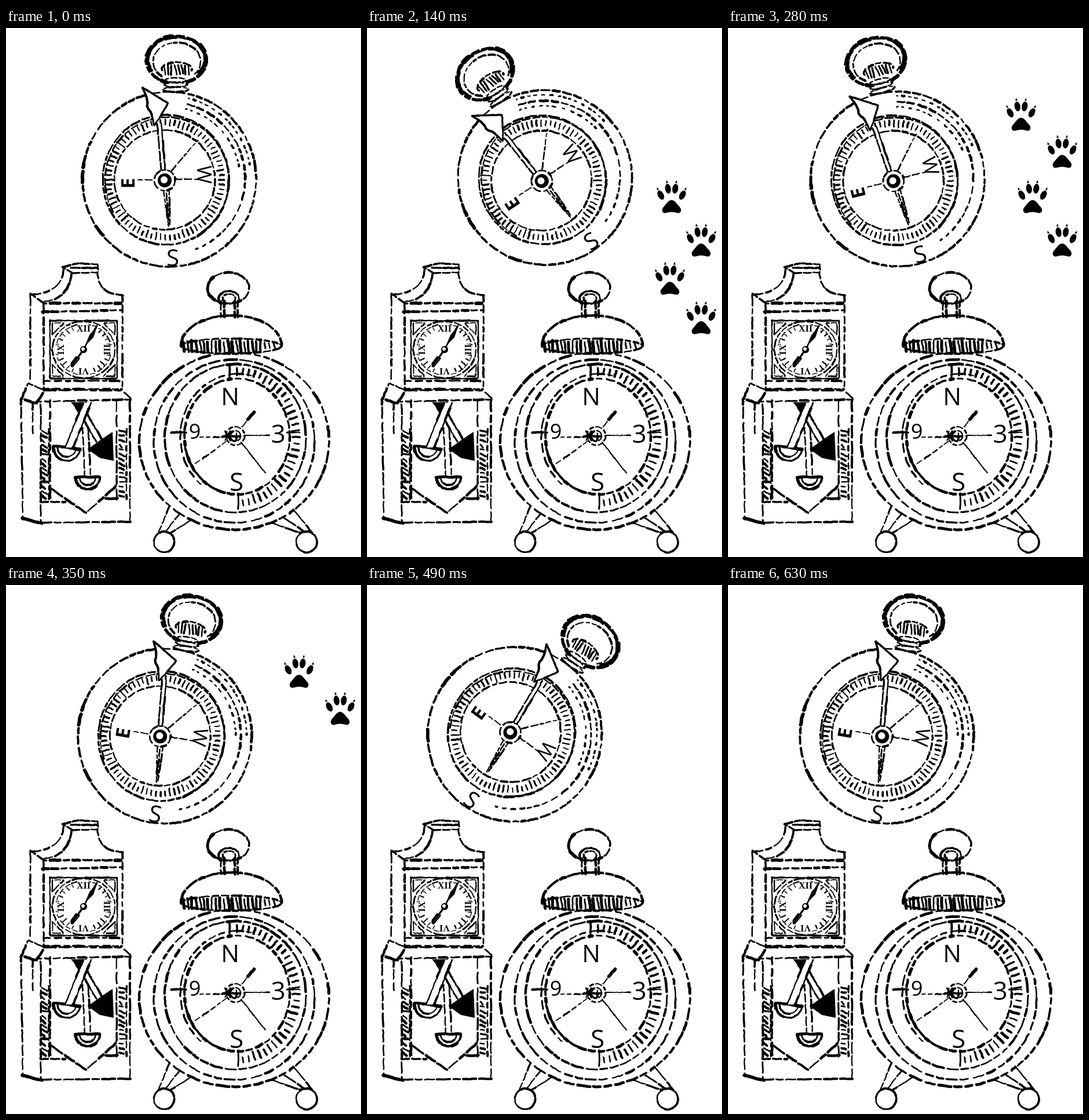
Animation, 613 px wide and 913 px high, one loop 700 ms. Source, as an HTML page:

```html
<!DOCTYPE html>
<html lang="en">
<head>
<meta charset="utf-8">
<title>Rolling compass and clocks</title>
<style>
  html, body { margin: 0; width: 100%; height: 100%; overflow: hidden; background: #fff; }
  svg { display: block; width: 613px; height: 913px; }
  path { stroke-linecap: round; stroke-linejoin: round; }
  text { font-family: "Open Sans", sans-serif; text-anchor: middle; dominant-baseline: central; }
  .roman { font: bold 16px "Liberation Serif", serif; }
</style>
</head>
<body>
<svg id="stage" viewBox="0 0 613 913"></svg>
<script>
const NS = 'http://www.w3.org/2000/svg';
const add = (parent, tag, attrs = {}) => {
  const el = document.createElementNS(NS, tag);
  for (const k in attrs) el.setAttribute(k, attrs[k]);
  return parent.appendChild(el);
};
let seed = 11;
const rnd = () => (seed = seed * 16807 % 2147483647) / 2147483647;

const stage = document.getElementById('stage');
const probe = document.createElementNS(NS, 'path');

// Brush line: short uneven strokes along a path; gap 0 gives a solid line.
function ink(g, d, w = 3.4, dash = 11, gap = 3) {
  for (const part of d.split(/(?=M)/)) {
    probe.setAttribute('d', part);
    const length = probe.getTotalLength();
    for (let s = 0; s < length;) {
      const end = Math.min(length, s + dash * (.5 + rnd()));
      const pts = [];
      for (let i = 0; i <= 4; i++) {
        const p = probe.getPointAtLength(s + (end - s) * i / 4);
        pts.push((p.x + rnd() - .5).toFixed(1) + ' ' + (p.y + rnd() - .5).toFixed(1));
      }
      add(g, 'path', { d: 'M' + pts.join('L'), fill: 'none', stroke: '#000',
        'stroke-width': (w * (.65 + .75 * rnd())).toFixed(1) });
      s = end + (gap ? w + gap * (.3 + rnd()) : 0);
    }
  }
}
const solid = (g, d, w = 3) => ink(g, d, w, 16, 0);
const strokes = (g, d, w = 2.8) => ink(g, d, w, 99, 0);
const fill = (g, d, color = '#000') => add(g, 'path', { d, fill: color });
const letter = (g, s, x, y, size, turn = 0, weight = 400) => add(g, 'text', {
  x, y, 'font-size': size, 'font-weight': weight, transform: `rotate(${turn} ${x} ${y})`
}).textContent = s;

const at = (cx, cy, rx, ry, deg) => {
  const a = deg * Math.PI / 180;
  return (cx + rx * Math.cos(a)).toFixed(1) + ' ' + (cy + ry * Math.sin(a)).toFixed(1);
};
function oval(cx, cy, rx, ry = rx, from = 0, to = 360) {
  const pts = [];
  for (let i = 0; i <= 60; i++) pts.push(at(cx, cy, rx, ry, from + (to - from) * i / 60));
  return 'M' + pts.join('L');
}
function ticks(cx, cy, rx, ry, len, n, from = 0, to = 360) {
  let d = '';
  for (let i = 0; i < n; i++) {
    const a = from + (to - from) * i / n, k = len * (.6 + .6 * rnd());
    d += 'M' + at(cx, cy, rx, ry, a) + 'L' + at(cx, cy, rx - k, ry - k, a);
  }
  return d;
}
function hatch(x0, x1, y0, y1, step) {
  let d = '';
  for (let x = x0; x <= x1; x += step) d += `M${x} ${y0 + 4 * rnd()}L${x + 4 * rnd()} ${y1 - 4 * rnd()}`;
  return d;
}
const hub = (g, x, y, r) => {
  fill(g, oval(x, y, r));
  fill(g, oval(x - 1, y - 1, r / 2), '#fff');
};

function drawCompass(g) {
  // crown and neck
  ink(g, oval(294, 55, 52, 41, 110, 430), 6, 15, 1);
  ink(g, oval(294, 54, 49, 38, 150, 400), 4, 14, 1);
  ink(g, oval(295, 58, 41, 33, 130, 400), 3, 10, 2);
  ink(g, oval(295, 71, 26, 12, 170, 370));
  strokes(g, hatch(273, 316, 62, 82, 6));
  for (let i = 0; i < 3; i++) ink(g, oval(293, 90 + 8 * i, 18 + 2 * i, 4), 2.6, 7, 2);

  // case: a heavy lower left, a speckled upper right
  ink(g, oval(282, 261, 150, 151, 70, 190), 4.6, 15, 2);
  ink(g, oval(282, 261, 150, 151, 190, 430), 3.6, 12, 3);
  ink(g, oval(278, 259, 135, 132, -75, 68), 3.4, 9, 5);
  for (const r of [124, 143]) ink(g, oval(280, 260, r, r, -76, -10), 3, 4, 7);

  // dial
  ink(g, oval(276, 262, 109, 112), 3.4, 13, 2);
  ink(g, oval(278, 263, 107, 109, 150, 420), 2.6, 15, 3);
  strokes(g, ticks(275, 262, 102, 104, 11, 76));
  ink(g, oval(274, 262, 87, 86), 3, 11, 3);
  ink(g, 'M228 262H256M294 261H332M286 246L331 194', 2.2, 9, 3);
  letter(g, 'E', 209, 268, 33, -90, 700);
  letter(g, 'W', 343, 253, 34, 90, 500);
  letter(g, 'S', 288, 395, 40);

  // needle
  fill(g, 'M261 165H268L276 246L267 248Z', '#fff');
  ink(g, 'M261 166L268 247M268 165L275 245', 3, 22, 1);
  ink(g, 'M272 280L281 344M282 280L283 342M277 285L281 335', 2.8, 10, 2);
  const head = 'M236 103L280 130L256 169L251 147L244 137V123Z';
  fill(g, head, '#fff');
  solid(g, head, 3.6);

  fill(g, oval(274, 263, 18), '#fff');
  ink(g, oval(274, 263, 18), 3.2, 9, 2);
  hub(g, 274, 263, 12);
}

function drawTallClock(g) {
  // pediment and head
  ink(g, 'M98 413L123 406L159 408V422L114 423L99 413M112 414H158', 3.2, 18, 1);
  ink(g, 'M100 413C99 445 76 459 43 460M113 423C111 452 94 470 65 472M158 422C160 448 171 460 202 461', 3.4, 15, 2);
  ink(g, 'M42 458L65 475H202M63 490L201 487', 4.2, 13, 2);
  ink(g, 'M42 460V612M65 475V623M201 462V620M66 609H200M66 623H200', 3.2, 13, 4);

  // face
  const cx = 134, cy = 555;
  solid(g, `M76 505H192V605H76Z`, 2.8);
  for (const sx of [-1, 1]) for (const sy of [-1, 1])
    ink(g, `M${cx + 54 * sx} ${cy + 26 * sy}v${20 * sy}h${-20 * sx}Z`, 2.2, 14, 2);
  ink(g, oval(cx, cy, 54, 49), 2.6, 12, 2);
  ink(g, oval(cx, cy, 48, 44), 1.8, 8, 4);
  strokes(g, ticks(cx, cy, 46, 42, 7, 28), 1.8);
  ['XII', 'III', 'VI', 'IX'].forEach((s, i) => {
    const [x, y] = at(cx, cy, 40, 37, i * 90 - 90).split(' ');
    fill(g, oval(+x, +y, 13, 9), '#fff');
    letter(g, s, x, y, 16, i * 90);
    g.lastChild.setAttribute('class', 'roman');
  });
  solid(g, `M${cx} ${cy}L157 514M${cx} ${cy}L113 584`, 2.4);
  fill(g, 'M136 549L144 530L158 513L151 534Z');
  solid(g, 'M122 568L127 571L114 585L112 580Z', 2.5);
  hub(g, cx, cy, 6);

  // cabinet
  ink(g, 'M27 640L38 613L67 625L52 648Z', 3.6, 20, 1);
  ink(g, 'M67 625H200L216 640M52 645L215 641', 3.4, 15, 3);
  ink(g, 'M26 640L29 848M46 650V700M60 650V853M76 642V816M191 642V814M214 642V852', 3.2, 15, 4);
  ink(g, 'M28 846L62 855', 5, 16, 0);
  ink(g, 'M62 854L215 852M78 795L138 837L192 789M62 818H102M172 812H192', 3.4, 16, 2);
  for (const x of [62, 196]) {
    for (let y = 695; y < 812; y += 8) solid(g, `M${x} ${y}l${4 + 6 * rnd()} ${6 * rnd()}`, 3.4);
    ink(g, `M${x + 12} 692V814`, 3, 9, 3);
  }

  // pendulums
  const rod = (x0, y0, x1, y1, w, gap) => {
    fill(g, `M${x0 - w} ${y0}h${2 * w}L${x1 + w} ${y1}h${-2 * w}Z`, '#fff');
    ink(g, `M${x0 - w} ${y0}L${x1 - w} ${y1}M${x0 + w} ${y0}L${x1 + w} ${y1}`, 3.2, 14, gap);
  };
  const bowl = (x, y, r, tilt) => {
    solid(g, oval(x, y, r, r, tilt, 180 + tilt) + 'Z', 4.4);
    solid(g, oval(x, y, r - 7, r - 7, tilt, 180 + tilt), 3);
  };
  rod(137, 691, 141, 771, 5, 3);
  bowl(141, 775, 21, 0);
  rod(124, 649, 162, 714, 6, 0);
  fill(g, 'M112 646H140L130 664Z');
  fill(g, 'M184 697L186 747L162 742L141 727L166 709Z');
  bowl(105, 724, 23, 8);
  rod(140, 647, 109, 724, 7, 0);
}

function drawAlarmClock(g) {
  // handle and bell
  ink(g, oval(384, 449, 36, 27, 55, 420), 3.6, 17, 1);
  solid(g, oval(383, 449, 35, 27, 130, 225), 4.6);
  solid(g, oval(385, 468, 18, 14, 150, 390), 3.2);
  ink(g, oval(385, 467, 11, 8), 2.8, 8, 2);
  for (const x of [371, 377, 395, 400]) ink(g, `M${x} 471V499`, 3.6, 14, 2);
  ink(g, oval(389, 548, 87, 52, 180, 360), 3.8, 16, 2);
  ink(g, oval(389, 549, 87, 13), 3.6, 12, 2);
  strokes(g, hatch(306, 440, 539, 561, 7), 4);
  strokes(g, hatch(446, 468, 543, 556, 8), 3.4);

  // rims
  ink(g, oval(394, 713, 164, 153), 4, 15, 4);
  ink(g, oval(394, 713, 139, 141), 3.4, 15, 5);
  ink(g, oval(396, 708, 122, 128), 3.6, 18, 3);
  ink(g, oval(400, 705, 99, 108, 130, 285), 3, 12, 5);
  ink(g, oval(399, 705, 91, 100), 4, 11, 4);
  solid(g, oval(400, 705, 92, 100, 105, 170), 3.6);
  strokes(g, ticks(399, 706, 108, 119, 13, 32, -90, 90), 3.6);

  // dial
  solid(g, 'M386 581V606M401 803V830M285 698H311M485 698H507');
  letter(g, 'N', 387, 634, 42);
  letter(g, '9', 326, 695, 36);
  letter(g, '3', 470, 699, 44);
  letter(g, 'S', 398, 782, 44);
  solid(g, 'M412 703H455M406 715L448 768', 2.2);
  solid(g, 'M418 675L429 663', 4.4);
  ink(g, 'M327 752L380 714M335 706H378M408 688L418 676', 2.4, 9, 3);
  for (const r of [16, 9]) ink(g, oval(396, 704, r), 3, 8, 2);
  strokes(g, ticks(383, 704, 9, 9, 16, 6) + ticks(398, 705, 6, 6, 8, 4), 3);

  // feet run from the rim to a ball
  for (const [x, angle] of [[273, 125], [519, 59]]) {
    for (const side of [-1, 0, 1])
      ink(g, `M${at(394, 713, 164, 153, angle + 8 * side)}L${x - 10 * side} 872`, 3.2, 20, 1);
    fill(g, oval(x, 887, 18), '#fff');
    solid(g, oval(x, 887, 18), 3.2);
  }
}

function drawPaw(x, y) {
  const paw = add(stage, 'g', { transform: `translate(${x} ${y})` });
  fill(paw, 'M0 5C6 5 9 12 14 17C19 23 15 29 9 27C3 25-3 25-9 27C-15 29-19 23-14 17C-9 12-6 5 0 5Z');
  for (let i = -1.5; i < 2; i++) {
    const toe = add(paw, 'g', { transform: `translate(${12.5 * i} ${5.5 * i * i - 16}) rotate(${18 * i})` });
    add(toe, 'ellipse', { rx: 5, ry: 8.5 });
    fill(toe, 'M-2-10L0-15L2-10Z');
  }
  return paw;
}

const group = () => add(stage, 'g');
const compass = group();
drawCompass(compass);
drawTallClock(group());
drawAlarmClock(group());
const trail = [[523, 433], [577, 501], [526, 292], [577, 367], [506, 150], [577, 214]];
const paws = trail.map(([x, y]) => drawPaw(x, y));

// The motion is stepped: ten poses, 70 ms each.
const STEP = 70, STEPS = 10;

// Rolls left from rest, then swings over to the right and back.
const swing = step => step < 3
  ? -16.75 * step
  : 38 * Math.cos((step - 7) * 2 * Math.PI / STEPS) - 2.2;

function render(now) {
  const step = Math.floor(now / STEP) % STEPS;
  const angle = swing(step), rad = angle * Math.PI / 180;
  const dx = -46 * Math.sin(rad), dy = -18 * (1 - Math.cos(rad));
  compass.setAttribute('transform', `translate(${dx} ${dy}) rotate(${angle} 282 261)`);
  paws.forEach((paw, i) => {
    const age = step - Math.floor(i / 2);
    paw.setAttribute('visibility', age > 0 && age < 4 ? 'visible' : 'hidden');
  });
}

const start = performance.now();
function loop() {
  render(performance.now() - start);
  requestAnimationFrame(loop);
}
loop();
</script>
</body>
</html>
```
